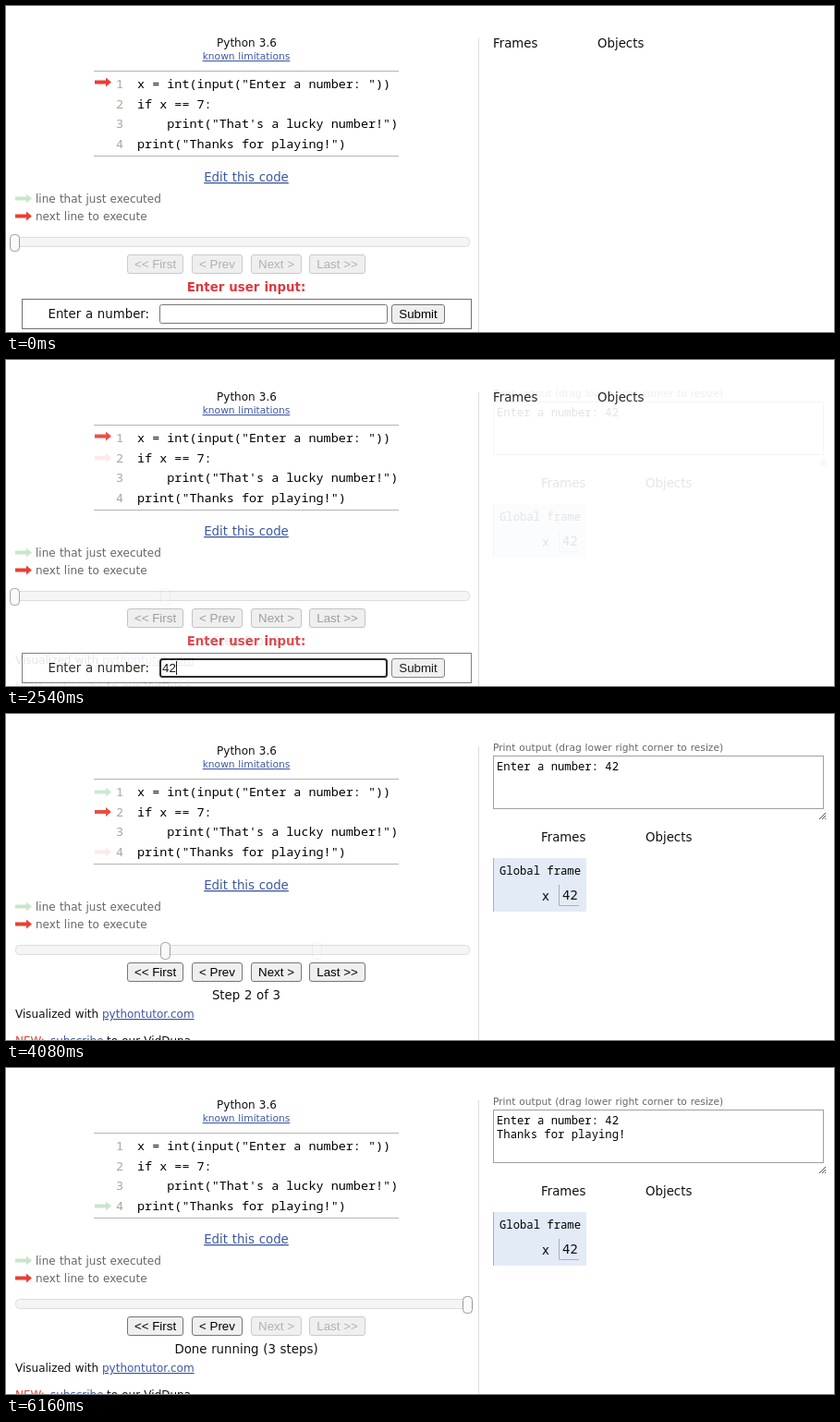
Recreate the animation shown at these times as an HTML page. Size 896 by 353 pixels, loop 8160 ms.

```html
<!DOCTYPE html>
<html lang="en">
<head>
<meta charset="utf-8">
<title>Stepping through a Python program</title>
<style>
  html, body { margin: 0; width: 100%; height: 100%; overflow: hidden; background: #fff; }
  svg { display: block; width: 896px; height: 353px; }
  text { font-family: "DejaVu Sans", Verdana, sans-serif; font-size: 13.33px; word-spacing: .034em; fill: #111; white-space: pre; }
  .mid { text-anchor: middle; }
  .tiny { font-size: 10.67px; }
  .small { font-size: 12px; }
  .link { fill: #3d58a2; text-decoration: underline; }
  .grey { fill: #666; }
  .prompt { font-weight: bold; fill: #dd393f; }
  .red { fill: #e93f34; }
  .code, .out { font-family: "Noto Sans Mono", "DejaVu Sans Mono", monospace; word-spacing: 0; fill: #000; }
  .code { font-size: 13.44px; }
  .out { font-size: 12.22px; }
  .num { fill: #aca798; }
  .ui { font-family: "Liberation Sans", Arial, sans-serif; word-spacing: 0; fill: #000; }
  .off { fill: #b1b1b5; }
</style>
</head>
<body>
<svg id="stage" viewBox="0 0 896 353"></svg>
<script>
const LOOP = 8160, STEP = 60, STEPS = 10;
const RED = '#e93f34', GREEN = '#c9e6ca';

const text = (x, y, s, cls = '') =>
  `<text x="${x}" y="${y}" class="${cls}">${s.replace(/</g, '&lt;')}</text>`;
const box = (x, y, w, h, fill, stroke, r = 0, sw = 1) =>
  `<rect x="${x}" y="${y}" width="${w}" height="${h}" rx="${r}" fill="${fill}" stroke="${stroke}" stroke-width="${sw}"/>`;
const line = (d, color) => `<path d="${d}" fill="none" stroke="${color}"/>`;
const arrow = (x, midY, color) =>
  `<path transform="translate(${x} ${midY - 5})" d="M0 3H12V0L18 5L12 10V7H0Z" fill="${color}"/>`;
const button = (x, y, w, label, on = true) =>
  box(x + .5, y + .5, w - 1, 20, '#efefef', on ? '#767676' : '#cbcbcb', 2.5) +
  text(x + w / 2, y + 15, label, 'ui mid' + (on ? '' : ' off'));

const program = [
  [142, 'x = int(input("Enter a number: "))'],
  [142, 'if x == 7:'],
  [174.3, 'print("That\'s a lucky number!")'],
  [142, 'print("Thanks for playing!")']
];

function codePane() {
  const rows = program.map(([x, s], i) => {
    const y = 89 + Math.round(i * 21.7);
    return text(119, y, String(i + 1), 'code num') + text(x, y, s, 'code');
  }).join('');
  return text(260.5, 44, 'Python 3.6', 'small mid') +
    text(260, 58, 'known limitations', 'tiny link mid') +
    line('M95 70.5H425M95 162.5H425', '#b3b3b3') + rows +
    text(260, 190, 'Edit this code', 'link mid') +
    arrow(10, 208.5, GREEN) + text(32, 213, 'line that just executed', 'small grey') +
    arrow(10, 227.5, RED) + text(32, 232, 'next line to execute', 'small grey') +
    line('M511.5 35V353', '#ddd');
}

function controls(pos, back, next) {
  return box(10.5, 250.5, 491, 10, '#f5f5f5', '#ddd', 4) +
    box(4.5 + Math.round(pos * 163.33), 247.5, 10, 18, '#fafafa', '#999', 4) +
    button(131, 269, 61, '<< First', back) + button(201, 269, 55, '< Prev', back) +
    button(265, 269, 55, 'Next >', next) + button(328, 269, 61, 'Last >>', next);
}

function inputForm(value) {
  const field = value
    ? box(167, 324, 245, 19, '#fff', '#101010', 2.5, 2) +
      text(169, 338, value, 'ui') + line('M184.5 326V341', '#000')
    : box(166.5, 323.5, 246, 20, '#fff', '#767676', 2);
  return text(260, 309, 'Enter user input:', 'prompt mid') +
    box(17.5, 317.5, 486, 32, '#fff', '#707070') +
    text(45.5, 338, 'Enter a number:') + field + button(417, 323, 58, 'Submit');
}

function footer(status) {
  return text(260, 309, status, 'mid') +
    text(10, 329, 'Visualized with', 'small') + text(104, 329, 'pythontutor.com', 'small link') +
    text(10, 358, 'NEW:', 'small red') + text(48, 358, 'subscribe', 'small link') +
    text(109, 358, 'to our VidDuna', 'small');
}

const headings = (x, y) => text(x, y, 'Frames') + text(x + 113, y, 'Objects');

function memory(output) {
  return text(527, 40, 'Print output (drag lower right corner to resize)', 'tiny grey') +
    box(527.5, 45.5, 357, 57, '#fff', '#a0a0a0') +
    output.map((s, i) => text(531, 61 + 15 * i, s, 'out')).join('') +
    line('M880 114L887 107M883 114L887 110M886 114L887 113', '#555') +
    headings(579, 138) +
    '<rect x="527" y="156" width="101" height="58" fill="#e2ebf6"/>' +
    line('M527.5 156V214M598.5 185V207.5H620', '#a6b3b6') +
    text(534, 174, 'Global frame', 'out') + text(580, 202, 'x') + text(602, 201, '42');
}

const asking = value =>
  arrow(96, 82.5, RED) + controls(0, false, false) + inputForm(value) + headings(527, 45);
const running = (arrows, pos, next, status, output) =>
  arrows + controls(pos, true, next) + footer(status) + memory(output);

const entered = 'Enter a number: 42';
const scenes = [
  [0, asking('')],
  [1000, asking('42')],
  [2540, running(arrow(96, 84.5, GREEN) + arrow(96, 106, RED), 1, true, 'Step 2 of 3', [entered])],
  [4080, running(arrow(96, 106, GREEN) + arrow(96, 149.5, RED), 2, true, 'Step 3 of 3', [entered])],
  [5620, running(arrow(96, 149.5, GREEN), 3, false, 'Done running (3 steps)',
    [entered, 'Thanks for playing!'])]
];

const stage = document.getElementById('stage');
stage.innerHTML = scenes.map(([, body]) =>
  `<g opacity="0"><rect width="896" height="353" fill="#fff"/>${codePane()}${body}</g>`).join('');
const layers = [...stage.children];

// Each opaque scene fades in over the one before it, in ten equal steps.
function draw() {
  const t = performance.now() % LOOP;
  scenes.forEach(([start], i) => {
    const n = Math.floor((t - start) / STEP) + 1;
    layers[i].setAttribute('opacity', i ? Math.min(STEPS, Math.max(0, n)) / STEPS : 1);
  });
  requestAnimationFrame(draw);
}
draw();
</script>
</body>
</html>
```
